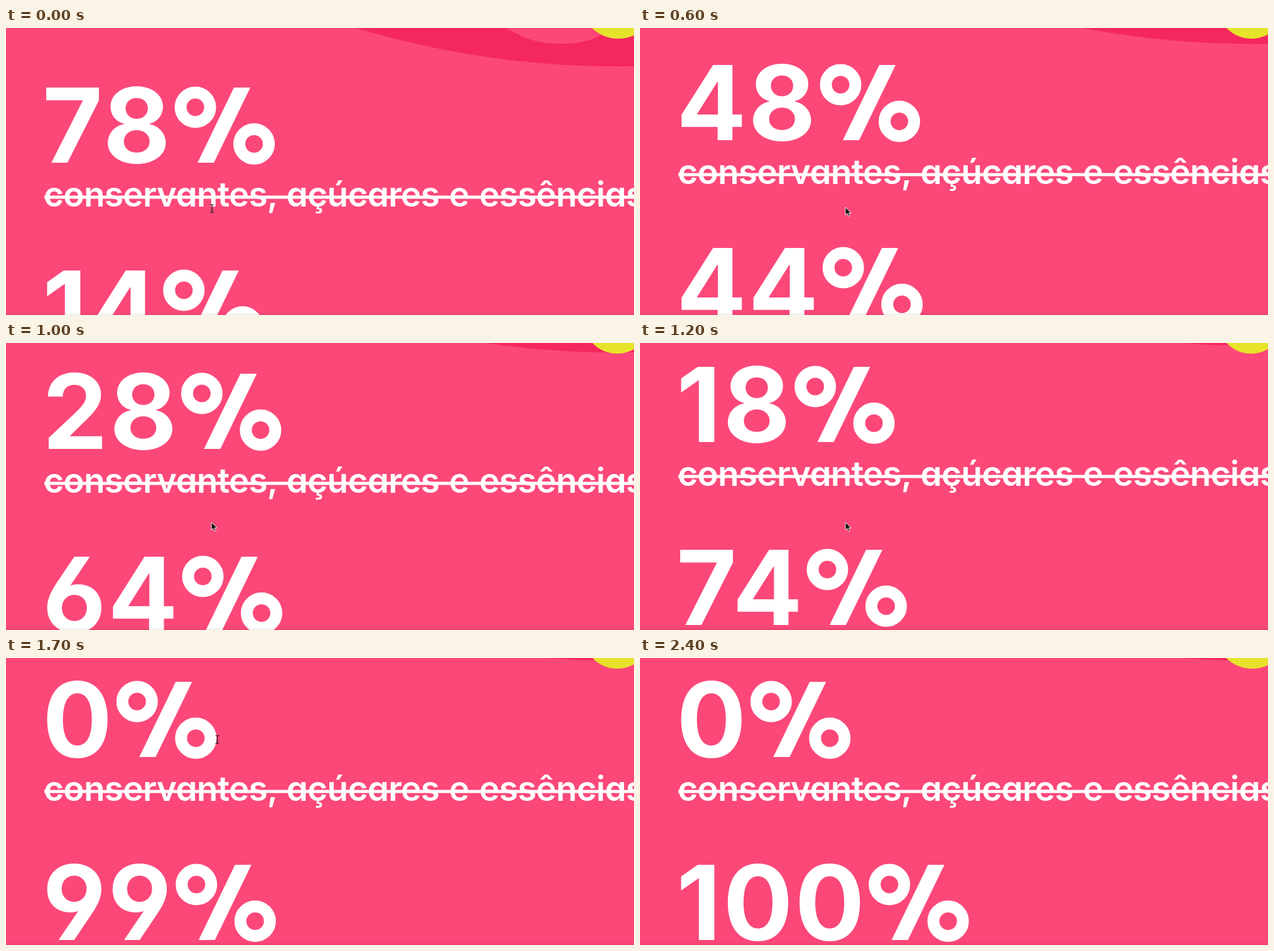
These frames come from a looping animation (1000x458 px, 2500 ms). An HTML page:

```html
<!DOCTYPE html>
<html lang="pt">
<head>
<meta charset="utf-8">
<title>Contadores</title>
<style>
  html, body { margin: 0; width: 100%; height: 100%; overflow: hidden; background: #fb4879; }
  svg { display: block; width: 100%; height: 100%; }
  text { fill: #fff; }
  /* Inter alternates: flat three, open six and nine, single-storey a */
  .number { font: 700 165px Inter, sans-serif; letter-spacing: 3px; font-feature-settings: "cv09", "cv03", "cv04"; }
  .label { font: 600 55px Inter, sans-serif; letter-spacing: -.8px; font-feature-settings: "cv11"; }
</style>
</head>
<body>
<svg viewBox="0 0 1000 458">
  <defs>
    <linearGradient id="shade" x2="0" y2="1">
      <stop offset="0" stop-opacity="0"/>
      <stop offset="1" stop-opacity=".07"/>
    </linearGradient>
    <g id="percent">
      <g fill="none" stroke="#fff" stroke-width="19">
        <circle cx="33.5" cy="-88.5" r="23.5"/>
        <circle cx="127" cy="-30" r="23.5"/>
      </g>
      <path d="M37 0L95-120H121L63 0Z" fill="#fff"/>
    </g>
  </defs>
  <rect width="1000" height="458" fill="#fb4879"/>

  <g id="page">
    <path d="M557 0C690 40 840 64 1000 61V0Z" fill="#f4285f"/>
    <path d="M797 0C830 20 850 25 885 25S945 17 960 0Z" fill="#fb4879"/>
    <g id="falling" transform="translate(58 215)"><text class="number"></text><use href="#percent"/></g>
    <text class="label" y="285"><tspan x="60">conservantes,</tspan> <tspan x="446.5">açúcares</tspan> <tspan x="705.5">e</tspan> <tspan x="753.5">essências</tspan></text>
    <rect x="61" y="267.5" width="939" height="5" fill="#fff"/>
    <g id="rising" transform="translate(58 507)"><text class="number"></text><use href="#percent"/></g>
  </g>

  <circle id="blob" fill="#e7e32b"/>
  <rect y="453" width="1000" height="5" fill="url(#shade)"/>

  <path id="arrow" d="M0 0V12.5L2.9 9.8L5 14.4L7.2 13.4L5.2 9H9.2Z" fill="#111" stroke="#fff" stroke-width=".9"/>
  <path id="beam" d="M-3-6.5Q0-6.5 0-4.5Q0-6.5 3-6.5M0-5V5M-3 6.5Q0 6.5 0 4.5Q0 6.5 3 6.5M-1.5 2H1.5" fill="none" stroke="#222" stroke-width="1.2"/>
</svg>
<script>
const LOOP = 2500, STEP = 100;
const get = id => document.getElementById(id);
const [page, falling, rising, blob, arrow, beam] =
  ['page', 'falling', 'rising', 'blob', 'arrow', 'beam'].map(get);

// Scroll distance at each step; the last value holds.
const scroll = [0, 20, 32, 36, 36, 36, 36, 36, 38, 42, 46, 53, 57];
const beamAt = { 0: [328, 288], 16: [333, 200], 17: [336.5, 130], 18: [340, 40] };

function place(node, point) {
  node.style.display = point ? '' : 'none';
  if (point) node.setAttribute('transform', `translate(${point})`);
}

function showNumber(group, value) {
  const [digits, percent] = group.children;
  digits.textContent = value;
  percent.setAttribute('x', digits.getComputedTextLength() + 3);
}

function draw(time) {
  const step = Math.floor(time % LOOP / STEP);
  const offset = scroll[Math.min(step, scroll.length - 1)];
  place(page, [0, -offset]);

  showNumber(falling, Math.max(0, 78 - 5 * step));
  showNumber(rising, Math.min(100, 14 + 5 * step));

  const sway = Math.sin(Math.PI * step / 25);
  const radius = 60 - 7 * sway;
  blob.setAttribute('cx', 975 - 2 * sway);
  blob.setAttribute('cy', 17 - radius);
  blob.setAttribute('r', radius);

  place(beam, beamAt[step]);
  place(arrow, step > 0 && step < 16 ? [327, 286] : null);
}

const start = performance.now();
function tick() {
  draw(performance.now() - start);
  requestAnimationFrame(tick);
}
tick();
</script>
</body>
</html>
```
